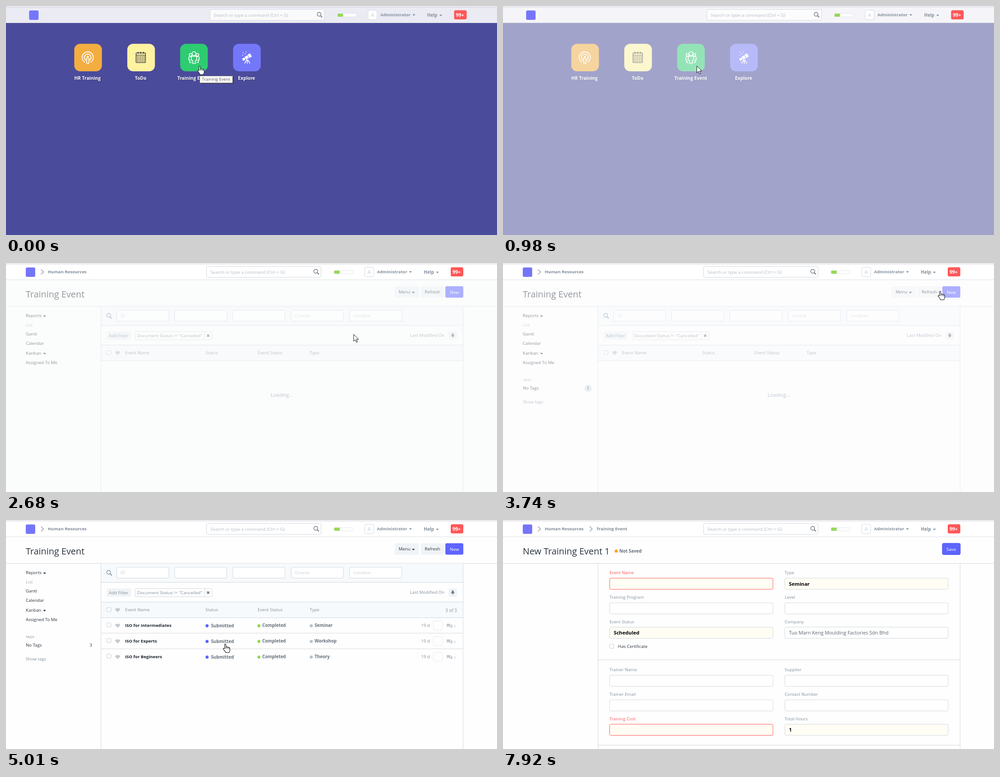
Write an HTML page that moves like this. It is 1093x512 px and loops after 8 s.

```html
<!DOCTYPE html>
<html lang="en">
<head>
<meta charset="utf-8">
<title>Training event demo</title>
<style>
html, body { margin: 0; width: 100%; height: 100%; overflow: hidden; background: #fff; }
svg { display: block; width: 1093px; height: 512px; font-family: "Open Sans", "Noto Sans", sans-serif; }
text { white-space: pre; }
.shade { filter: drop-shadow(1px 1px 1px rgba(0, 0, 0, .35)); }
</style>
</head>
<body>
<svg id="stage" viewBox="0 0 1093 512"></svg>
<script>
const LINE = '#d1d8dd', GREY = '#83909d', DARK = '#2a333d', BLUE = '#5e64ff', RED = '#ff5858', PALE = '#f0f4f7';
const LOOP = 8000;

// Text placed by its left edge and the middle of its capitals
const text = (x, y, str, fill = GREY, size = 9.7, weight = 400, extra = '') =>
  `<text x="${x}" y="${y + size * .36}" fill="${fill}" font-size="${size}" font-weight="${weight}" ${extra}>${str}</text>`;
const bold = (x, y, str, fill = GREY, size = 9.62, extra = '') => text(x, y, str, fill, size, 700, extra);
const rect = (x, y, w, h, fill, r = 0, stroke = 'none', extra = '') =>
  `<rect x="${x}" y="${y}" width="${w}" height="${h}" rx="${r}" fill="${fill}" stroke="${stroke}" ${extra}/>`;
const dot = (x, y, r, fill, extra = '') => `<circle cx="${x}" cy="${y}" r="${r}" fill="${fill}" ${extra}/>`;
const path = (d, fill, stroke = 'none', width = 1, extra = '') =>
  `<path d="${d}" fill="${fill}" stroke="${stroke}" stroke-width="${width}" ${extra}/>`;
const stroke = (d, color = LINE, width = 1) => path(d, 'none', color, width);
const group = (id, body) => `<g id="${id}">${body}</g>`;
const caret = (x, y, fill) => path(`M${x} ${y}h6.6l-3.3 3.6z`, fill);
const lens = (x, y, color) =>
  dot(x, y, 4.3, 'none', `stroke="${color}" stroke-width="1.4"`) + stroke(`M${x + 3} ${y + 3}l4 4`, color, 1.8);

function nav() {
  const chevron = x => stroke(`M${x} 14.5l5.5 5.5l-5.5 5.5`, '#99a2ab', 1.6);
  return rect(0, 0, 1093, 38, '#fff', 0, 'none', 'id="navBack"') + stroke('M0 37.5H1093', '#dde1e6') +
    group('bar',
      rect(44, 10, 21, 21, '#7575fa', 3) +
      group('crumb1', chevron(78) + bold(93, 20, 'Human Resources', '#7f8b97')) +
      group('crumb2', chevron(193) + bold(208, 20, 'Training Event', '#7f8b97')) +
      rect(446.5, 7.5, 255, 24.5, '#fff', 3, LINE, 'fill-opacity=".75"') +
      text(455, 20, 'Search or type a command (Ctrl + G)', '#b4bbc3', 9.85) + lens(689.5, 18.5, '#6c7680') +
      rect(730.5, 17, 42, 7, '#fff', 2, '#e3e6ea') + rect(730.5, 17, 12.5, 7, '#98d85b', 2) +
      rect(798.5, 9.5, 20, 21, '#fff', 3, '#d4d8de') + text(805, 20, 'A', '#c4c9d0', 11) +
      bold(826, 20, 'Administrator', GREY, 9.5) + caret(897, 18.5, GREY) +
      bold(930, 20, 'Help', GREY, 10) + caret(957, 19.5, GREY) +
      rect(990, 9.5, 28, 20.5, RED, 3.5) + bold(994, 20, '99+', '#fff', 10.6)) +
    rect(0, 0, 1093, 1.5, '#fff') + stroke('M0 2H1093', '#c6c2cf');
}

function podcast() {
  return stroke('M176 126A12.5 12.5 0 1 1 188 126M178 121.3A7.5 7.5 0 1 1 186 121.3', '#fff', 1.9) +
    dot(182, 113.5, 2.3, '#fff') + path('M178.8 117.5h6.4v5h-1v6.2h-4.4v-6.2h-1z', 'none', '#fff', 1.6);
}
function calendar() {
  const ink = '#494747';
  let out = rect(289.5, 105, 21, 21.5, 'none', 1, ink, 'stroke-width="1.6"') + stroke('M289 110h22', ink, 1.4) +
    stroke('M294 102.5v4M300 102.5v4M306 102.5v4', ink, 2.4);
  for (let i = 0; i < 20; i++) out += rect(291.6 + i % 5 * 3.7, 112.3 + Math.floor(i / 5) * 3.4, 2, 2, ink);
  return out;
}
function people() {
  const ring = 'stroke="#fff" stroke-width="1.7"';
  return dot(411, 109, 3, 'none', ring) + dot(426, 109, 3, 'none', ring) +
    stroke('M413 126.5h-4v-6h-2v-5q0-2.5 3-2.5h4M424 126.5h4v-6h2v-5q0-2.5-3-2.5h-4', '#fff', 1.7) +
    dot(418.5, 106.5, 4.3, '#2ecc71', ring) +
    path('M412.5 121.5v-6q0-3 3-3h6q3 0 3 3v6h-3v7h-6v-7z', '#2ecc71', '#fff', 1.7);
}
function telescope() {
  return '<g transform="translate(535.5 115.5) rotate(-31)">' + rect(-10, -3, 6, 5.5, '#fff', 1) +
    rect(-3, -3.7, 7, 7, '#fff') + rect(5, -4.6, 6.5, 8.6, '#fff', 1) + '</g>' +
    stroke('M536 120l-5 8.5M537 120v9M538 120l5 8.5', '#fff', 1.7) +
    dot(528, 104, 1.1, '#fff') + dot(534.5, 102.5, 1, '#fff') + dot(527, 110, .9, '#fff') + dot(532, 107, 1, '#fff');
}
function home() {
  const tile = (x, fill, icon, label, left) =>
    rect(x, 84.5, 61.5, 61.5, fill, 13) + icon + bold(left, 161.5, label, '#fff', 10.25, 'class="shade"');
  return rect(0, 0, 1093, 512, '#4b4b9c') +
    tile(152, '#f3ad41', podcast(), 'HR Training', 152) +
    tile(270, '#fff3a1', calendar(), 'ToDo', 287) +
    tile(387.7, '#2ecc71', people(), 'Training Event', 381.5) +
    tile(505.5, '#7478f8', telescope(), 'Explore', 516.5);
}

const tooltip = () => rect(434, 159, 73, 15, '#222', 0, 'none', 'opacity=".45"') +
  rect(431.5, 156.5, 73, 15.5, '#fff', 0, '#777') + text(436, 164, 'Training Event', '#555', 9.65);
const pageHead = title => rect(0, 38, 1093, 474, '#fefefe') + text(44, 70, title, DARK, 19.9) +
  stroke('M0 97H1093', LINE, 1.2);
const sides = () => stroke('M211.5 97V512M1017.5 97V512');
const box = (x, y) => rect(x, y, 9, 9, '#fff', 1, '#c5ccd3');
const heart = (x, y) => path(`M${x} ${y + 5}l-4.6-4.6a2.8 2.8 0 0 1 4.6-3.4a2.8 2.8 0 0 1 4.6 3.4z`, '#c3cad1');

function row(y, name, type) {
  const tag = (x, fill, label) => dot(x, y + .5, 3.5, fill) + bold(x + 7.5, y, label, '#65707b', 9.68);
  return box(224.5, y - 6) + heart(248.5, y) + bold(265, y, name, '#1c232b', 9.6) +
    dot(447.5, y + .5, 3.5, BLUE) + bold(456.5, y, 'Submitted', '#65707b', 9.75) +
    tag(563, '#98d85b', 'Completed') + tag(679.5, '#b8c2cc', type) + text(924, y, '19 d') +
    rect(951.5, y - 10, 20, 20, 'none', 3, LINE, 'stroke-dasharray="2 1.5"') +
    path(`M981 ${y - 4}h8v6h-5l-2 2v-2h-1zM990.5 ${y - 2}h3v6h-1v2l-2-2h-4l1-1.5h3z`, '#c3cad1') +
    text(996.5, y + 1, '0', '#b8c2cc', 8);
}

function list() {
  const button = (x, w, label, left) => rect(x, 52, w, 25.5, PALE, 3) + text(left, 65, label, DARK);
  const filters = [[246.5, 'ID'], [375.5, ''], [505, ''], [635, 'Course'], [765, 'Location']];
  return pageHead('Training Event') +
    button(865, 54, 'Menu', 874) + caret(903.5, 64.5, DARK) + button(923, 52, 'Refresh', 932) +
    rect(978, 52, 40, 25.5, BLUE, 3, 'none', 'id="newButton"') + text(988, 65, 'New', '#fff', 9.8) +
    text(44, 118, 'Reports', DARK) + caret(82.5, 117.5, DARK) + text(44, 139, 'List', '#a3adb7') +
    text(44, 159, 'Gantt', DARK) + text(44, 180, 'Calendar', DARK) + text(44, 202, 'Kanban', DARK) +
    caret(82.5, 201, DARK) + text(44, 222.5, 'Assigned To Me', DARK) +
    group('tags', text(44, 261, 'TAGS', GREY, 7.9) + text(44, 280, 'No Tags', DARK) +
      rect(181, 272.5, 17, 16, '#dfe6ec', 8, 'none', 'id="badge"') + text(186, 280, '3', DARK) +
      text(44, 311, 'Show tags')) +
    rect(212, 97.5, 805, 42, '#f7fafc') + rect(212, 184, 805, 34, '#f7fafc') +
    stroke('M212 139.5H1017M212 183.5H1017M212 218.5H1017') + sides() + lens(228.5, 117, GREY) +
    filters.map(([x, label]) => rect(x, 105.5, 116, 24.5, '#fff', 3, LINE) + text(x + 8.5, 118, label, '#c5cbd2')).join('') +
    rect(224, 153, 54, 18.5, PALE, 2) + text(229, 162.5, 'Add Filter') +
    rect(287.5, 153.5, 171.5, 18, '#fff', 2, LINE) + stroke('M441.5 153.5v18') +
    text(292, 162.5, 'Document Status != "Cancelled"', GREY, 9.85) + stroke('M447.5 160l5 5m0-5l-5 5', '#69737d', 2) +
    text(899, 162, 'Last Modified On') + rect(985, 153, 19, 18.5, PALE, 3) +
    path('M992.5 157.5h4v4h2.5l-4.5 5l-4.5-5h2.5z', '#707a84') +
    box(224.5, 196) + heart(248.5, 201) + text(265, 201, 'Event Name') + text(444, 201, 'Status') +
    text(560, 201, 'Event Status') + text(676, 201, 'Type') +
    group('loading', text(589, 295.5, 'Loading...', GREY, 11.1)) +
    group('rows', text(978, 202, '3 of 3', GREY, 9.9) + row(236, 'ISO for Intermediates', 'Seminar') +
      row(271, 'ISO for Experts', 'Workshop') + row(306, 'ISO for Begineers', 'Theory') +
      stroke('M212 253H1017M212 288H1017'));
}

function form() {
  const field = (col, y, label, value = '', kind = '') => {
    const x = col ? 627.5 : 237.5, need = kind === 'need';
    return text(x - .5, y, label, need ? RED : GREY, 9.6) +
      rect(x, y + 12, 363.5, 25, kind ? '#fffdf4' : '#fff', 3, need ? RED : LINE) +
      (kind ? bold(x + 9, y + 24.5, value, '#000', 11.15) : text(x + 9, y + 24.5, value, '#5a646e', 10.9));
  };
  return pageHead('New Training Event 1') + dot(252, 69.5, 3.5, '#ffa00a') + bold(259, 69, 'Not Saved', '#65707b', 9.8) +
    rect(978, 52, 40, 25.5, BLUE, 3, '#4a50e8') + text(987, 65, 'Save', '#fff', 9.8) + sides() +
    field(0, 118, 'Event Name', '', 'need') + field(1, 118, 'Type', 'Seminar', 'set') +
    field(0, 173, 'Training Program') + field(1, 173, 'Level') +
    field(0, 227.5, 'Event Status', 'Scheduled', 'set') +
    field(1, 227.5, 'Company', 'Tuo Marn Keng Moulding Factories Sdn Bhd') +
    box(237.5, 278) + text(256, 283, 'Has Certificate', DARK) + stroke('M212 312.5H1017M212 503.5H1017') +
    field(0, 335, 'Trainer Name') + field(1, 335, 'Supplier') +
    field(0, 390, 'Trainer Email') + field(1, 390, 'Contact Number') +
    field(0, 444.5, 'Training Cost', '', 'need') + field(1, 444.5, 'Total Hours', '1', 'set') +
    rect(247, 135, 1, 16, '#222', 0, 'none', 'id="typeCaret"');
}

const round = 'stroke-linejoin="round"';
document.getElementById('stage').innerHTML =
  group('home', home()) + group('list', list()) + group('form', form()) +
  rect(0, 0, 1093, 512, '#fafbfc', 0, 'none', 'id="freeze"') +
  nav() + group('tooltip', tooltip()) +
  group('pointer',
    group('arrow', path('M.5 0V15.5l3.6-3.3l2.4 5.7l2.5-1.1l-2.4-5.5h5z', '#fff', '#111', 1, round)) +
    group('hand', path('M-1.5 10.5V1.7q0-1.5 1.5-1.5t1.5 1.5V7q2-1.2 3.3.3q2-.8 3 .7q2-.4 2.4 1.5v4.5q-.5 2.5-1.7 5.3h-7.5q-1-3-5-7.3q-1.2-2 .5-2.3z', '#fff', '#111', 1.1, round) +
      stroke('M1.5 7v4M4.800 7.5v3.5M7.8 8.5v3', '#111', .9)));

const el = id => document.getElementById(id);
const show = (id, on) => el(id).setAttribute('visibility', on ? 'inherit' : 'hidden');
const ramp = (t, a, b) => Math.min(1, Math.max(0, (t - a) / (b - a)));
const within = (t, a, b) => t >= a && t < b;
const linear = k => k;
const smooth = k => k * k * (3 - 2 * k);

// Pointer strokes: start, end, easing, Bezier points
const moves = [
  [2370, 2710, smooth, [431, 134], [620, 195], [780, 158]],
  [3030, 3550, smooth, [780, 158], [930, 130], [973, 63]],
  [4310, 5010, linear, [973, 63], [860, 370], [520, 455], [488, 278]],
  [5010, 5080, linear, [488, 278], [495, 219]],
  [5150, 5480, smooth, [495, 219], [760, 180], [1025, 27]],
  [5480, 5640, smooth, [1025, 27], [991.5, 68]]
];
function bezier(points, k) {
  if (points.length < 2) return points[0];
  const next = points.slice(1).map((q, i) => points[i].map((v, j) => v + (q[j] - v) * k));
  return bezier(next, k);
}
function pointerAt(t) {
  const [a, b, ease, ...points] = moves.findLast(m => m[0] <= t) || moves[0];
  return bezier(points, ease(ramp(t, a, b)));
}

function draw(t) {
  const isHome = t < 2680, isForm = t >= 6660, isList = !isHome && !isForm;
  show('home', isHome);
  show('list', isList);
  show('form', isForm);
  show('crumb1', !isHome);
  show('crumb2', isForm);
  show('tooltip', t < 710);

  const frozen = ramp(t, 700, 980) * (1 - ramp(t, 3740, 3950));
  el('freeze').setAttribute('opacity', frozen / 2);
  el('navBack').setAttribute('fill-opacity', isHome ? .89 : 1);
  el('bar').setAttribute('transform', `translate(${isHome ? 7.5 : 0} 0)`);

  show('tags', isList && t >= 3030);
  el('badge').setAttribute('opacity', frozen);
  show('loading', isList && t < 3770);
  show('rows', isList && t >= 3770);

  const [x, y] = pointerAt(t);
  const onNew = within(x, 978, 1018) && within(y, 52, 77.5);
  el('newButton').setAttribute('fill', !onNew ? BLUE : within(t, 5870, 6110) ? '#1c22e0' : '#2b33ff');
  show('typeCaret', isForm && (t < 7190 || within(t, 7710, 7870)));

  const hand = t < 710 || within(t, 3740, 4350) || within(t, 4970, 5080) || onNew;
  el('pointer').setAttribute('transform', `translate(${x} ${y})`);
  show('pointer', !isForm);
  show('hand', hand);
  show('arrow', !hand);
}

const start = performance.now();
function tick() {
  draw((performance.now() - start) % LOOP);
  requestAnimationFrame(tick);
}
tick();
</script>
</body>
</html>
```
